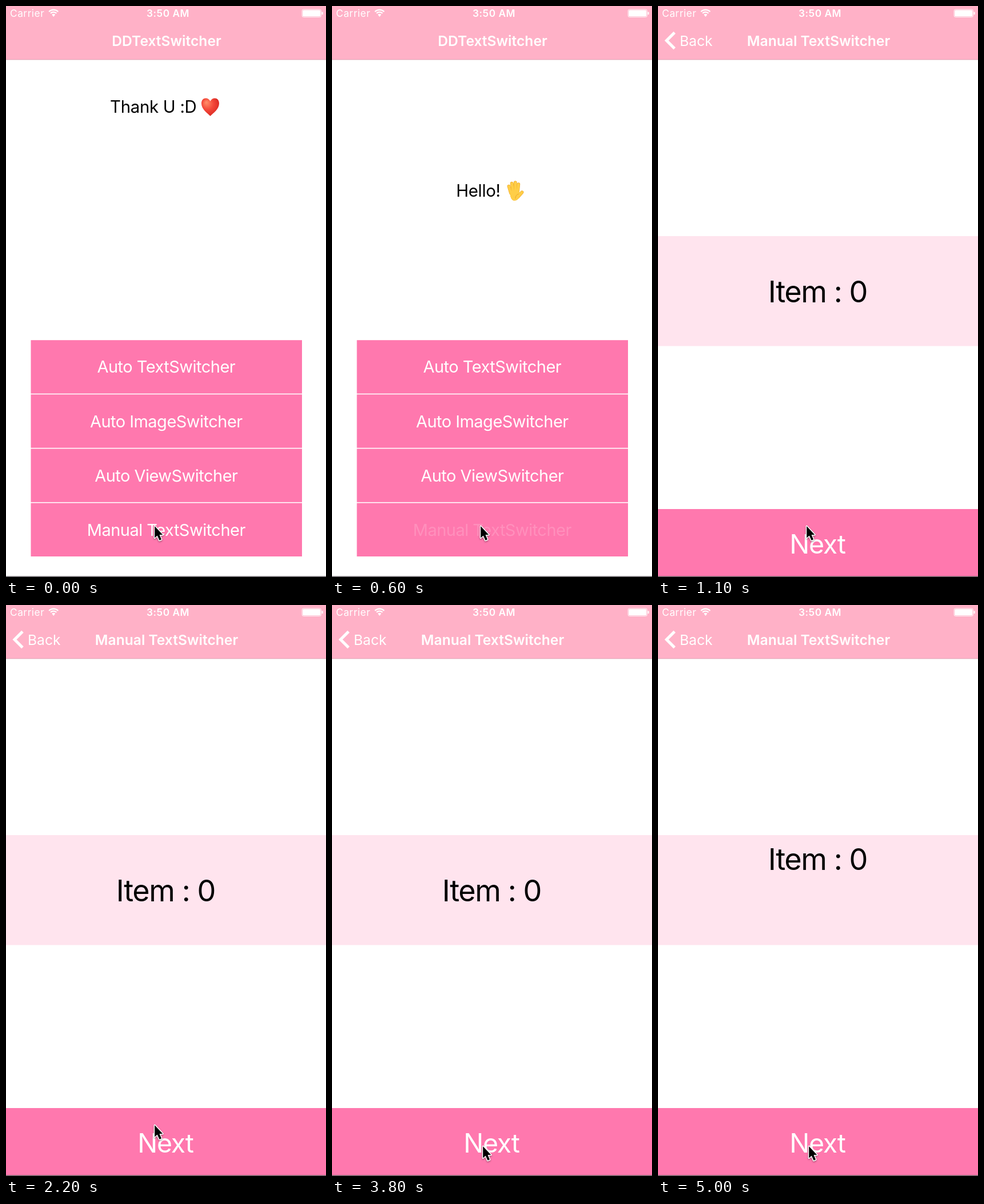
Write an HTML page with a canvas that moves like this. It is 560 px wide and 1000 px high and loops after 5.1 s.

```html
<!DOCTYPE html>
<html lang="en">
<head>
<meta charset="utf-8">
<title>Text switcher demo</title>
<style>
  html, body { margin: 0; width: 100%; height: 100%; overflow: hidden; background: #fff; }
  canvas { display: block; width: 560px; height: 1000px; }
</style>
</head>
<body>
<canvas id="stage" width="560" height="1000"></canvas>
<script>
const ctx = document.getElementById('stage').getContext('2d');
const W = 560, H = 1000, LOOP = 5100, STEP = 100;
const PINK = '#ff78ae', NAV = '#ffb1c7', PALE = '#ffe4ee';
const NAV_H = 94;

const clamp = v => Math.min(1, Math.max(0, v));
const smooth = v => { v = clamp(v); return v * v * (3 - 2 * v); };

function rect(x, y, w, h, color) {
  ctx.fillStyle = color;
  ctx.fillRect(x, y, w, h);
}

function text(str, x, y, size, { color = '#fff', weight = 400, align = 'center', spacing = 0, alpha = 1 } = {}) {
  ctx.save();
  ctx.globalAlpha *= alpha;
  ctx.font = `${weight} ${size}px Inter, sans-serif`;
  ctx.letterSpacing = `${spacing * size}px`;
  ctx.textAlign = align;
  ctx.fillStyle = color;
  ctx.fillText(str, x, y);
  ctx.restore();
}

function clipped(x, y, w, h, draw) {
  ctx.save();
  ctx.beginPath();
  ctx.rect(x, y, w, h);
  ctx.clip();
  draw();
  ctx.restore();
}

function polyline(points) {
  ctx.beginPath();
  points.forEach(([x, y]) => ctx.lineTo(x, y));
}

function heart(x, y) {
  ctx.save();
  ctx.translate(x, y);
  const red = ctx.createRadialGradient(-7, -8, 1, -2, -2, 21);
  red.addColorStop(0, '#ff8a66');
  red.addColorStop(0.45, '#f4493a');
  red.addColorStop(1, '#d5231f');
  ctx.fillStyle = red;
  ctx.beginPath();
  ctx.moveTo(0, -10);
  ctx.bezierCurveTo(-4, -18, -15.5, -17, -15.5, -6);
  ctx.bezierCurveTo(-15.5, 4, -5, 11, 0, 16);
  ctx.bezierCurveTo(5, 11, 15.5, 4, 15.5, -6);
  ctx.bezierCurveTo(15.5, -17, 4, -18, 0, -10);
  ctx.fill();
  ctx.restore();
}

function hand(x, y) {
  const fingers = [[-10.5, -8, -7, 4], [-5.2, -13, -3, 2], [0.8, -14.5, 1, 2], [6.3, -11.5, 5, 2], [12.5, 2.5, 5, 11]];
  ctx.save();
  ctx.translate(x, y);
  ctx.lineCap = 'round';
  const palm = () => {
    ctx.beginPath();
    ctx.moveTo(-9, 0);
    ctx.lineTo(7.5, 0);
    ctx.lineTo(9, 8);
    ctx.quadraticCurveTo(6, 17, -1, 17);
    ctx.quadraticCurveTo(-8, 17, -9, 0);
    ctx.fill();
  };
  for (const [color, width] of [['#eda62b', 5.8], ['#ffce47', 4.6]]) {
    ctx.strokeStyle = ctx.fillStyle = color;
    ctx.lineWidth = width;
    for (const [x1, y1, x2, y2] of fingers) {
      polyline([[x1, y1], [x2, y2]]);
      ctx.stroke();
    }
    palm();
  }
  ctx.strokeStyle = '#eda62b';
  ctx.lineWidth = 1;
  ctx.beginPath();
  ctx.arc(9, 13, 8, 3.1, 4.4);
  ctx.stroke();
  ctx.restore();
}

function statusBar() {
  text('Carrier', 7, 19, 17.3, { align: 'left', spacing: 0.03 });
  text('3:50 AM', 283.5, 19, 17.3, { weight: 600, spacing: 0.03 });
  ctx.strokeStyle = ctx.fillStyle = '#fff';
  ctx.lineWidth = 2.2;
  for (const r of [7.4, 11.4]) {
    ctx.beginPath();
    ctx.arc(83.2, 18, r, -Math.PI * 0.75, -Math.PI * 0.25);
    ctx.stroke();
  }
  ctx.beginPath();
  ctx.moveTo(83.2, 19);
  ctx.arc(83.2, 18, 4.2, -Math.PI * 0.75, -Math.PI * 0.25);
  ctx.fill();

  ctx.lineWidth = 0.8;
  ctx.beginPath();
  ctx.roundRect(518, 6, 33.5, 13.5, 2.8);
  ctx.stroke();
  ctx.beginPath();
  ctx.roundRect(519.2, 7.2, 31.1, 11.1, 1.6);
  ctx.fill();
  ctx.beginPath();
  ctx.roundRect(552.6, 10.3, 2, 5, 1);
  ctx.fill();
}

function navBar(pushed, slide) {
  rect(0, 0, W, NAV_H, NAV);
  rect(0, NAV_H - 0.6, W, 1, '#dfa2b4');
  statusBar();
  if (!pushed) {
    text('DDTextSwitcher', 281, 69.5, 24.6, { weight: 600 });
    return;
  }
  const left = slide / 46;
  text('Manual TextSwitcher', 281 + 35 * left, 69.5, 24.6, { weight: 600 });
  text('Back', 38 + 13 * left, 69.5, 24.6, { align: 'left', alpha: 1 - 0.86 * left });
  ctx.save();
  ctx.globalAlpha = 1 - 0.55 * left;
  ctx.strokeStyle = '#fff';
  ctx.lineWidth = 5;
  polyline([[29, 46.5], [15, 60.5], [29, 74.5]]);
  ctx.stroke();
  ctx.restore();
}

function menuPage(t) {
  rect(0, 0, W, H, '#fff');
  clipped(0, NAV_H, W, 458, () => {
    const rise = 458 * smooth((t + 377) / 1000);
    const style = { color: '#000', align: 'left', spacing: -0.01 };
    text('Thank U :D', 182, 333.5 - rise, 29.4, style);
    heart(357.5, 323 - rise);
    text('Hello!', 217.2, 791.5 - rise, 29.4, style);
    hand(320, 781 - rise);
  });
  ['Auto TextSwitcher', 'Auto ImageSwitcher', 'Auto ViewSwitcher', 'Manual TextSwitcher'].forEach((label, i) => {
    const y = 585.2 + i * 95.1;
    rect(43.5, y, 474.5, 93.5, PINK);
    text(label, 280.3, y + 57.2, 29, { spacing: -0.018, alpha: i === 3 && t >= 600 && t < 700 ? 0.18 : 1 });
  });
}

function itemPage(t) {
  rect(0, 0, W, H, '#fff');
  rect(0, 403, W, 192.5, PALE);
  clipped(0, 403, W, 192.5, () => {
    const rise = 192.5 * smooth((t - 4647) / 1000);
    text('Item : 0', 279.4, 519 - rise, 52.1, { color: '#000', spacing: -0.027 });
  });
  rect(0, 881, W, 119, PINK);
  const alpha = t < 4647 ? 1 : 0.2 + 0.8 * smooth((t - 4647) / 300);
  text('Next', 279, 959, 46.4, { spacing: -0.026, alpha });
}

function pointer(t) {
  const u = clamp((t - 3050) / 550);
  const go = 1 - (1 - u) ** 2;
  ctx.save();
  ctx.translate(260.2 + 4 * go, 911 + 37 * go);
  polyline([[0, 0], [0, 20.5], [4.6, 16.4], [8.3, 24.8], [11.8, 23.3], [8.3, 15], [14, 15]]);
  ctx.closePath();
  ctx.lineJoin = 'round';
  ctx.strokeStyle = '#fff';
  ctx.lineWidth = 3;
  ctx.shadowColor = 'rgba(0,0,0,.35)';
  ctx.shadowBlur = 3;
  ctx.shadowOffsetY = 1.5;
  ctx.stroke();
  ctx.shadowColor = 'transparent';
  ctx.fillStyle = '#000';
  ctx.fill();
  ctx.restore();
}

function draw(t) {
  const pushed = t >= 700;
  const slide = pushed && t < 1100 ? 46 * Math.exp(-(t - 700) / 88) : 0;
  if (!pushed) menuPage(t);
  if (slide) {
    const done = 1 - slide / W;
    ctx.save();
    ctx.translate(-168 * done, 0);
    menuPage(t);
    ctx.restore();
    rect(0, 0, W, H, `rgba(10,0,20,${0.095 * done})`);
    const shade = ctx.createLinearGradient(slide - 10, 0, slide, 0);
    shade.addColorStop(0, 'rgba(0,0,0,0)');
    shade.addColorStop(1, 'rgba(0,0,0,.05)');
    rect(slide - 10, 0, 10, H, shade);
  }
  if (pushed) {
    ctx.save();
    ctx.translate(slide, 0);
    itemPage(t);
    ctx.restore();
  }
  navBar(pushed, slide);
  rect(0, 998.5, W, 1.5, '#686468');
  pointer(t);
}

function tick() {
  const t = performance.now() % LOOP;
  draw(Math.floor(t / STEP) * STEP);
  requestAnimationFrame(tick);
}
tick();
</script>
</body>
</html>
```
